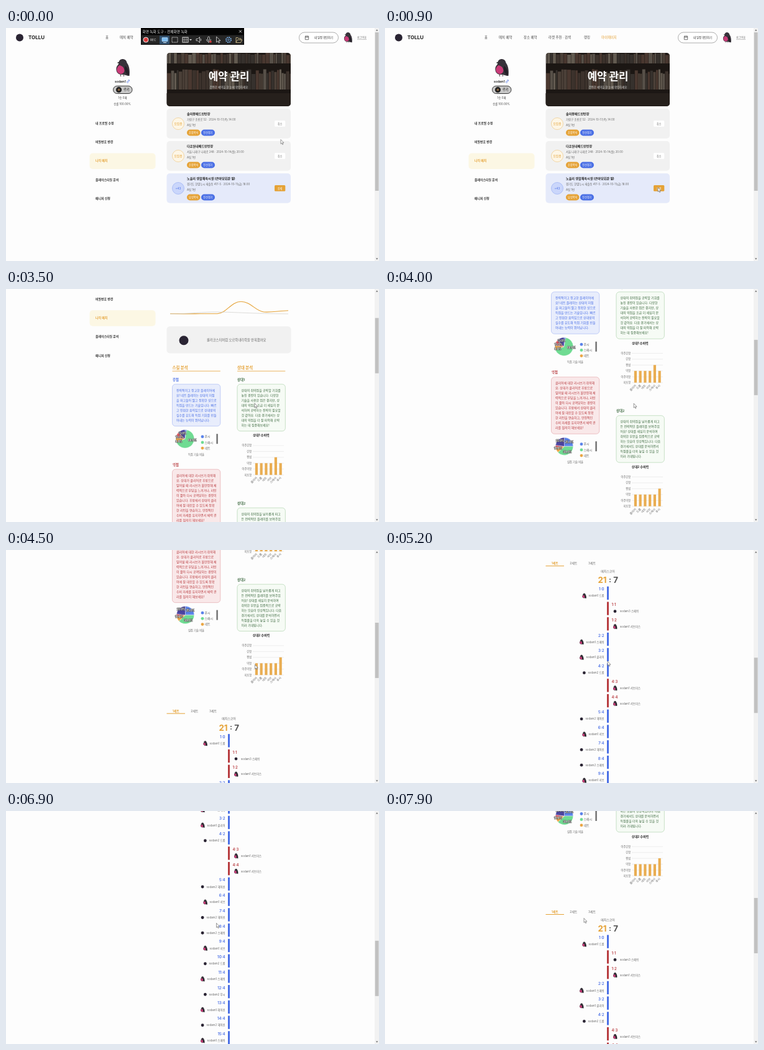
Animation of 600x375 px, one loop 8000 ms. Source, as an HTML page:

```html
<!DOCTYPE html>
<html lang="ko">
<head>
<meta charset="utf-8">
<style>
html, body { margin: 0; width: 100%; height: 100%; overflow: hidden; background: #fdfdfd; }
svg { display: block; width: 600px; height: 375px; font-family: Inter, "Noto Sans CJK KR", "Noto Sans CJK", sans-serif; }
</style>
</head>
<body>
<svg id="stage" viewBox="0 0 600 375"></svg>
<script>
const ORANGE = '#e5a236', BLUE = '#4a6fe5', RED = '#b83c40', GREEN = '#3f6b42', INK = '#222', GRAY = '#666';

const text = (x, y, s, size = 5, fill = INK, weight = 400, anchor = 'start', extra = '') =>
  `<text x="${x}" y="${y + size * .36}" font-size="${size}" fill="${fill}" font-weight="${weight}" text-anchor="${anchor}" ${extra}>${s}</text>`;
const mid = (x, y, s, size, fill, weight) => text(x, y, s, size, fill, weight, 'middle');
const rect = (x, y, w, h, fill, r = 0, stroke = 'none', sw = .6) =>
  `<rect x="${x}" y="${y}" width="${w}" height="${h}" rx="${r}" fill="${fill}" stroke="${stroke}" stroke-width="${sw}"/>`;
const dot = (x, y, r, fill, stroke = 'none', sw = .6) =>
  `<circle cx="${x}" cy="${y}" r="${r}" fill="${fill}" stroke="${stroke}" stroke-width="${sw}"/>`;
const path = (d, stroke, w = .6, fill = 'none') =>
  `<path d="${d}" fill="${fill}" stroke="${stroke}" stroke-width="${w}"/>`;
const pill = (x, y, w, h, fill, s, size, ink = '#fff') =>
  rect(x, y, w, h, fill, h / 2) + mid(x + w / 2, y + h / 2, s, size, ink, 500);
const calendar = (x, y, s) => `<g transform="translate(${x} ${y}) scale(${s})">` +
  path('M-3-2.5h6v6h-6zM-3-.5h6M-1.5-3.5v2M1.5-3.5v2', '#444', .8) + '</g>';

// Bird about 23 wide and 29 high at scale 1, centred on x, y
const bird = (x, y, s = 1) => `<g transform="translate(${x} ${y}) scale(${s})">` +
  path('M-3 10V14M2 10V14', '#55454a', 1) +
  path('M-6-8C-6-16 6-16 7-8C11-3 12 5 11 13C6 13 4 11 1 11C-8 12-11 6-10 0C-9-4-6-5-6-8Z', 'none', 0, '#37323a') +
  path('M-5-4C0-3 3 0 3 5C2 10-3 11-6 9C-11 6-10-1-5-4Z', 'none', 0, '#c93c78') +
  path('M4-3C9 1 11 7 10 12C5 10 2 3 4-3Z', 'none', 0, '#232027') +
  path('M-5.5-9.5L-9-8L-5.5-7Z', 'none', 0, '#222') + '</g>';
const avatar = (x, y, id, s = .3) => id === 1 ? bird(x, y, s) : dot(x, y, 2.4, '#2a2433');

function frame() {
  const nav = [[160, '홈'], [183, '매치 예약'], [223, '장소 예약'], [263, '라켓 추천 · 검색'], [320, '랭킹'], [348, '마이페이지']];
  const menu = ['내 프로필 수정', '비밀번호 변경', '나의 매치', '플레이스타일 분석', '매니저 신청'];
  return dot(22, 15.5, 6, '#2a2433') + text(36, 15.5, 'TOLLU', 8, INK, 700) +
    nav.map(([x, s], i) => text(x, 15, s, 5.4, i === 5 ? ORANGE : '#444')).join('') +
    rect(471.5, 7, 63, 17, '#fff', 8.5, '#777') + calendar(484, 15.5, .9) + text(496, 15.5, '내 일정 확인하기', 4.3, INK, 500) +
    bird(550, 15.5, .6) + text(565, 15.5, '로그아웃', 4.1, GRAY, 400, 'start', 'text-decoration="underline"') +
    bird(187.5, 64) + mid(184, 86, 'sodam1', 4.9, INK, 600) + mid(196.5, 86, '♂', 5.5, BLUE, 700) +
    rect(172.5, 93.3, 30.5, 12.2, '#c8c8c8', 6.1, '#222', .9) + dot(181.5, 99.4, 4.6, '#222') + dot(181.5, 99.4, 1.8, '#8a6440') +
    text(189, 99.4, '루키', 5.2, INK, 500) +
    mid(187.5, 112.3, '1승 0패', 4.4, '#444') + mid(187, 122, '승률 100.00%', 4.4, '#444') +
    rect(134.5, 201.5, 106, 25.5, '#fcf7e4', 5) +
    menu.map((s, i) => text(144, 153 + i * 30.3, s, 4.9, i === 2 ? ORANGE : '#333', 600)).join('');
}

function shelf() {
  let seed = 7, out = rect(258.5, 40, 200, 86, '#1c1714');
  const rnd = () => (seed = seed * 16807 % 2147483647) / 2147483647;
  const tones = ['#4b4038', '#575048', '#3c322c', '#625a50', '#36312d', '#4a3830'];
  for (const [base, height] of [[57, 18], [99, 33]])
    for (let x = 259; x < 457;) {
      const w = 3 + rnd() * 4, h = height * (.75 + rnd() * .25);
      out += rect(x, base - h, w - .5, h, tones[rnd() * 6 | 0]);
      x += w;
    }
  return '<clipPath id="cover"><rect x="258.5" y="40" width="199.5" height="86" rx="5"/></clipPath>' +
    `<g clip-path="url(#cover)">${out}${rect(258, 105, 201, 21, '#26201c')}</g>`;
}

function booking(y, title, place, badge, kind, own) {
  const tint = own ? BLUE : ORANGE;
  return rect(258.5, y, 199.5, 47.7, own ? '#e5eafa' : '#f1f1f1', 5) +
    dot(277, y + 24, 9.5, own ? '#cad6fb' : '#fdf6e6', own ? '#91a8f2' : '#edc276') + mid(277, y + 24, badge, 4.7, tint) +
    text(291, y + 8.3, title, 5.1, INK, 700) + text(291, y + 17.2, place, 4.35, GRAY) + text(291, y + 26, 'A팀 1번', 4.35, GRAY) +
    pill(291, y + 33.5, 21.5, 10, ORANGE, kind, 4.2) + pill(314, y + 33.5, 22, 10, BLUE, '친선경기', 4.2) +
    rect(432, y + 19, 17.3, 9.8, own ? ORANGE : '#fff', 1.5) + mid(440.6, y + 24, own ? '상세' : '취소', 4.2, own ? '#fff' : '#777');
}

const listPage = () => shelf() + mid(358.5, 78, '예약 관리', 16.8, '#fff', 700) +
  mid(358.5, 95, '간편한 예약을 한 눈에 확인하세요', 4.4, '#ddd') +
  booking(130, '솔미봉배드민턴장', '가람구 초롱로 52 · 2024-10-17(목) 14:00', '모집중', '혼합복식') +
  booking(182, '다온실내배드민턴장', '서울 나래구 나래로 248 · 2024-10-14(월) 20:00', '모집중', '혼합복식') +
  booking(234, '노을리 생활체육시설 (큰마당회관 옆)', '경기도 한별누시 새솔동 417-5 · 2024-10-11(금) 18:00', '+43', '남성복식', true);

function note(x, y, lines, ink, fill, edge) {
  return rect(x, y, 77.3, lines.length * 8 + 11.5, fill, 5, edge) +
    lines.map((s, i) => text(x + 6.5, y + 10 + i * 8, s, 4.95, ink)).join('');
}

function pie(cx, cy, r, shares, labels, caption) {
  const tones = ['#5b83ea', '#6fdb92', '#eaa645', '#e0525c', '#4b44a0'];
  const at = a => `${cx + r * Math.sin(a)} ${cy - r * Math.cos(a)}`;
  let a = 0, out = '';
  shares.forEach((p, i) => {
    const b = a + p * Math.PI * 2;
    out += path(`M${cx} ${cy}L${at(a)}A${r} ${r} 0 ${p > .5 ? 1 : 0} 1 ${at(b)}Z`, '#fff', .4, tones[i]);
    a = b;
  });
  for (const [dx, dy, s] of labels)
    out += text(cx + dx, cy + dy, s, 4.3, '#fff', 600, 'middle', 'stroke="#444" stroke-width=".9" paint-order="stroke"');
  ['푸시', '스매시', '네트'].forEach((s, i) => {
    const y = cy - 3.5 + i * 9.2;
    out += dot(316, y, 2.4, tones[i]) + text(319.5, y, s, 4.9, GRAY);
  });
  return out + rect(338.3, cy - 8, 2.6, 16, '#777') + mid(306, cy + 25, caption, 4.3, GRAY);
}

function bars(y, title, tall) {
  let out = mid(410.5, y, title, 5, INK, 700);
  ['아주강함', '강함', '평범', '약함', '아주약함', '미포함'].forEach((s, i) => {
    const g = y + 16.3 + i * 9.45;
    out += path(`M397 ${g}H447`, '#ddd', .5) + text(395, g, s, 4.2, GRAY, 400, 'end');
  });
  ['클리어', '드롭', '네트', '서브', '스매시', '푸시'].forEach((s, i) => {
    const x = 400.8 + i * 7.75, h = i === tall ? 28.4 : 18.9;
    out += rect(x, y + 63.5 - h, 4.2, h, '#e9ad52') +
      text(0, 0, s, 4.6, GRAY, 400, 'end', `transform="translate(${x + 2.6} ${y + 67.3}) rotate(-45)"`);
  });
  return out;
}

function rally() {
  const plays = `L1드롭 R3스매쉬 R1서브미스 L1스매쉬 L1클리어 L2드롭 R1서브미스 R1서브미스 L2헤어핀 L1서브 L2헤어핀
    L2스매쉬 L1서브 L2드롭 L1스매쉬 L2푸시 L1헤어핀 L2헤어핀 L1스매쉬 R2서브미스 R4서브 R1서브미스
    L1스매쉬 L2드롭 L1서브 L2헤어핀 L1스매쉬 L2푸시`.split(/\s+/);
  let us = 0, them = 0, out = '';
  plays.forEach((p, i) => {
    const y = 765 + i * 24.75, left = p[0] === 'L', id = +p[1], shot = p.slice(2);
    left ? us++ : them++;
    const tint = left ? BLUE : RED, side = left ? 'end' : 'start';
    out += rect(357, y - 4.5, 3, 21.3, tint) +
      text(left ? 352.5 : 364.5, y, `${us}:${them}`, 6, tint, 600, side) +
      text(left ? 352.5 : 378, y + 10.7, `sodam${id} ${shot}`, 4.4, GRAY, 400, side) +
      avatar(left ? 329 - shot.length * 4.3 : 370, y + 10.7, id);
  });
  return out;
}

const heading = (x, s) => text(x, 294, s, 6.4, ORANGE, 600) + rect(x, 299, 77.3, .8, ORANGE);

const detailPage = () =>
  rect(258.5, 49, 199.5, 46.5, '#f9fafd', 5, '#a9b9f3') + text(273, 66.2, '승리', 10.8, BLUE, 700) +
  calendar(270.5, 83, .7) + text(275.3, 83, '10-11 18:00', 4.3, GRAY) +
  mid(334, 72, '2', 12, BLUE, 700) + mid(344.5, 71.5, ':', 11, GRAY) + mid(355.5, 72, '0', 12, GRAY) +
  [1, 3, 2, 4].map((id, i) => {
    const x = 397 + i % 2 * 28.5, y = i < 2 ? 65.5 : 77;
    return avatar(x, y, id, .34) + text(x + 6.5, y, 'sodam' + id, 4.2, id === 1 ? INK : GRAY, id === 1 ? 700 : 400);
  }).join('') +
  mid(358, 117, '이번 매치,', 10.4, '#111', 500) + mid(358, 134, '<tspan font-weight="700">sodam1</tspan>님은', 10.2, '#111', 500) +
  pill(333, 147, 50.5, 17, ORANGE, '롤러코스터', 7) +
  path('M264 207C290 207 292 207.5 312 207H340C354 207 362 187.5 378 187.5C394 187.5 401 203 415 204.3C430 205 438 202.5 454 202', ORANGE, 1.1) +
  path('M264 207.3C295 207.3 318 204 340 204.3C370 204.5 395 207 454 207.3', '#d5d3d0', .8) +
  rect(258.5, 227.5, 200, 43.3, '#f1f1f1', 5) + dot(286, 250, 7.5, '#2a2433') +
  text(323, 249.3, '롤러코스터처럼 오르락내리락을 반복했어요', 5.3, GRAY, 500) +
  heading(267.5, '스킬 분석') + heading(372, '상대 분석') +
  text(268, 313, '강점', 5.4, BLUE, 600) +
  note(267.5, 320.5, ['전략적이고 정교한 플레이어예', '요! 네트 플레이는 상대의 허점', '을 파고들어 짧고 정확한 샷으로', '득점을 만드는 기술입니다. 빠르',
    '고 민첩한 움직임으로 상대방의', '실수를 유도해 득점 기회를 만들', '어내는 능력이 뛰어납니다.'], BLUE, '#e8edfc', '#9fb3f3') +
  text(372, 313, '상대1', 5.4, GREEN, 600) +
  note(372, 320.5, ['상대의 취약점을 공략할 기회를', '놓친 경향이 있습니다. 다양한', '기술을 사용한 점은 좋지만, 상', '대의 약점을 조금 더 세심히 분',
    '석하여 공략하는 전략이 필요할', '것 같아요. 다음 경기에서는 상', '대의 약점을 더 잘 파악해 공략', '하는 데 집중해보세요!'], GREEN, '#f6fbf5', '#a6cfa4') +
  pie(288, 408.5, 14.8, [.03, .66, .08, .1, .13], [[12, 2, '66.0%'], [-10, 4, '8.0%'], [-9, -3, '10.0%'], [-4, -9, '13.0%']], '득점 기술 비율') +
  bars(403, '상대1 수비력', 4) +
  text(268, 450, '약점', 5.4, RED, 600) +
  note(267.5, 457.5, ['클리어에 대한 리시브가 취약해', '요. 상대가 클리어로 후방으로', '밀어낼 때 리시브가 불안정해 체', '력적으로 부담을 느끼거나, 리턴', '이 짧아 다시 공격당하는 경향이',
    '있습니다. 후방에서 상대의 클리', '어에 잘 대응할 수 있도록 정확', '한 리턴을 연습하고, 안정적인', '수비 자세를 유지하면서 체력 관', '리를 철저히 해보세요!'], RED, '#f9e8e9', '#e2a0a4') +
  text(372, 512, '상대2', 5.4, GREEN, 600) +
  note(372, 519.5, ['상대의 취약점을 날카롭게 파고', '든 전략적인 플레이를 보여주었', '어요! 상대를 세심히 분석하여', '취약한 부분을 집중적으로 공략',
    '하는 모습이 인상적입니다. 다음', '경기에서도 상대를 분석하면서', '득점률을 더욱 높일 수 있을 것', '이라 기대됩니다.'], GREEN, '#f6fbf5', '#a6cfa4') +
  pie(288.5, 569, 14.2, [.25, .38, .1, .04, .23], [[8, -7, '25.0%'], [5, 9, '38.0%'], [-10, 3, '10.0%'], [-7, -9, '23.0%']], '실점 기술 비율') +
  bars(602, '상대2 수비력', 5) +
  ['1세트', '2세트', '3세트'].map((s, i) => mid(273.3 + i * 29.9, 723.5, s, 4.9, i ? GRAY : ORANGE, i ? 400 : 600)).join('') +
  rect(258.5, 727, 29.5, 1, ORANGE) + mid(358.5, 736, '매치스코어', 4.9, GRAY) +
  mid(349.5, 750.3, '21', 13.3, ORANGE, 700) + mid(362, 749.5, ':', 12, '#555', 700) + mid(371, 750.3, '7', 13.3, '#555', 700) +
  rally();

const recorder = () => rect(217, 0, 166, 27, '#050505') + rect(218, 11.5, 164, 14.5, '#262626') +
  text(219.5, 5.8, '화면 녹화 도구 - 전체화면 녹화', 5.6, '#eee') + path('M375 3.5l4 4m0-4l-4 4', '#fff', .8) +
  dot(225, 19, 4, '#d93a3a', '#eee', 1) + text(232, 19, 'REC', 4.8, '#ddd') +
  rect(247, 12.5, 16, 13.5, '#31506e') + rect(251, 15.5, 9, 6, '#7dbdf2', .5, '#d6ecff') + path('M253 23.5h5', '#d6ecff', 1) +
  '<rect x="267" y="15" width="9" height="8" fill="none" stroke="#ddd" stroke-dasharray="1.4 1"/>' +
  rect(284, 15, 9, 8, 'none', 0, '#ddd', 1) + path('M284 19h9M287 15v8M290 15v8', '#ddd') + path('M295 18h4l-2 2.3z', 'none', 0, '#ddd') +
  path('M306 17.5h2.5l3-3v9l-3-3H306zM313 17q1.6 2 0 4', '#ddd', .8) +
  rect(324.5, 14, 3, 6, 'none', 1.5, '#ddd', .8) + path('M322.5 18q0 4 3.5 4t3.5-4M326 22v2', '#ddd', .8) + dot(329, 22, 1.8, '#d93a3a') +
  path('M338.5 14l0 9l2.2-2l1.6 3.2l1.4-.7l-1.6-3.1h3z', '#ddd', .8) +
  '<circle cx="358" cy="19" r="4" fill="none" stroke="#78aee8" stroke-width="1.8" stroke-dasharray="2 1.1"/>' + dot(358, 19, 1.4, 'none', '#78aee8', .8) +
  path('M370 23.5v-8h3l1 1.5h4v2M370 23.5l2.2-4.5h7.5l-2.2 4.5z', '#d8c58f', .8);

const stage = document.getElementById('stage');
stage.innerHTML = rect(0, 0, 600, 375, '#fdfdfd') +
  `<g id="page">${frame()}<g id="list">${listPage()}</g><g id="detail">${detailPage()}</g></g>` +
  rect(593, 0, 7, 375, '#f2f2f2') + path('M595 4.5l1.7-2.2l1.7 2.2zM595 370.5l1.7 2.2l1.7-2.2z', 'none', 0, '#666') +
  `<rect id="thumb" x="593.7" width="5.8" fill="#c1c1c1"/><g id="recorder">${recorder()}</g>` +
  '<g id="cursor">' + path('M0 0v7l1.6-1.4l1.1 2.5l1.1-.5l-1.1-2.4h2.2z', '#555', .6, '#fff') + '</g>';
const [page, list, detail, thumb, rec, cursor] =
  ['page', 'list', 'detail', 'thumb', 'recorder', 'cursor'].map(id => document.getElementById(id));

const scrollKeys = [[2800, 0], [3500, 167], [4500, 464], [5800, 905], [6300, 1060], [6650, 1060], [6900, 852], [7900, 561]];
const xKeys = [[100, 442], [900, 439], [2500, 439], [2900, 399.5], [4600, 400.5], [5500, 337], [6400, 337], [6900, 338.5], [7500, 338], [7850, 320]];
const yKeys = [[100, 179.5], [900, 256.5], [2500, 256.5], [2900, 183.5], [4600, 184.5], [5500, 176.5], [6400, 176.5], [6900, 180.5], [7500, 180], [7850, 172.5]];

function at(keys, t) {
  const i = keys.findIndex(k => k[0] > t);
  if (i < 0) return keys[keys.length - 1][1];
  if (i === 0) return keys[0][1];
  const [t0, a] = keys[i - 1], [t1, b] = keys[i];
  return a + (b - a) * (t - t0) / (t1 - t0);
}

const show = (el, on) => el.setAttribute('display', on ? 'inline' : 'none');

function draw(now) {
  const t = now % 8000, y = at(scrollKeys, t), opened = t >= 1900;
  show(rec, t < 100);
  show(list, !opened);
  show(detail, opened);
  page.setAttribute('transform', `translate(0 ${-y})`);
  thumb.setAttribute('y', 7 + y / 4.22);
  thumb.setAttribute('height', opened ? 89 : 255);
  cursor.setAttribute('transform', `translate(${at(xKeys, t)} ${at(yKeys, t)})`);
  requestAnimationFrame(draw);
}
draw(performance.now());
</script>
</body>
</html>
```
